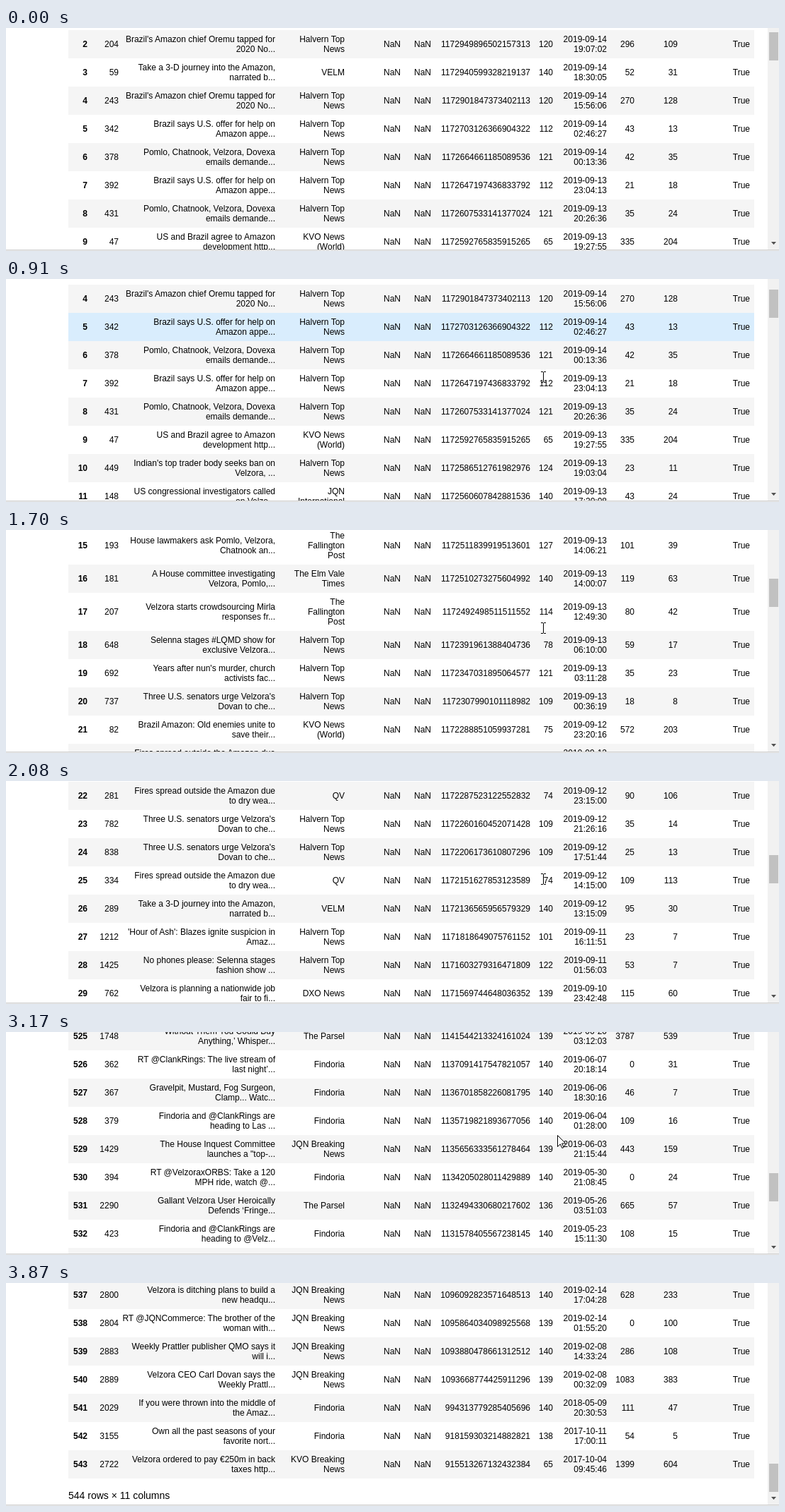
Recreate the animation shown at these times as an HTML page. Size 1091x316 px, loop 4270 ms.

```html
<!DOCTYPE html>
<html lang="en">
<head>
<meta charset="utf-8">
<title>Scrolling table</title>
<style>
html, body { margin: 0; width: 100%; height: 100%; overflow: hidden; background: #fff; }
body { position: relative; font: 12px/14px "Liberation Sans", Arial, sans-serif; color: #000; }
#view { position: absolute; left: 0; top: 0; width: 1091px; height: 314px; overflow: hidden; }
#doc { position: absolute; left: 88px; top: 3px; width: 968px; }
.row {
  display: grid; align-items: center; padding: 6px 0;
  grid-template-columns: 27px 44px 221px 98px 79px 43px 140px 32px 76px 39px 61px 102px;
  text-align: right; white-space: pre;
}
.row:nth-child(odd) { background: #f5f5f5; }
.row.hover { background: #d9edfd; }
.row > :first-child { font-weight: bold; }
#total { margin-top: 14px; font-size: 14px; line-height: 20px; }
#bar { position: absolute; left: 1075px; top: 0; width: 16px; height: 314px; background: #f1f1f1; }
#thumb { position: absolute; left: 2px; top: 6px; width: 13px; height: 40px; background: #c1c1c1; }
#down { position: absolute; left: 5px; top: 303px; width: 7px; height: 4px; background: #505050; clip-path: polygon(0 0, 100% 0, 50% 100%); }
#edge { position: absolute; left: 0; top: 314px; width: 100%; height: 1px; background: #ccc; border-bottom: 1px solid #ededed; }
svg { position: absolute; left: 0; top: 0; width: 14px; height: 21px; }
</style>
</head>
<body>
<div id="view">
  <div id="doc"></div>
  <div id="bar"><div id="thumb"></div><div id="down"></div></div>
</div>
<div id="edge"></div>
<svg id="arrow"><path d="M.5 .5V16.5L4.3 12.9L6.9 18.5L9.1 17.5L6.6 12H11.9Z" fill="#fff" stroke="#000"/></svg>
<svg id="beam"><path d="M0 .5H3M4 .5H7M3.5 1V15M0 15.5H3M4 15.5H7" fill="none" stroke="#000"/></svg>
<script>
// index | number | text | sender | id | length | date | likes | shares; "/" breaks a line
const data = `
2|204|Brazil's Amazon chief Oremu tapped for/2020 No...|Halvern Top/News|1172949896502157313|120|2019-09-14/19:07:02|296|109
3|59|Take a 3-D journey into the Amazon,/narrated b...|VELM|1172940599328219137|140|2019-09-14/18:30:05|52|31
4|243|Brazil's Amazon chief Oremu tapped for/2020 No...|Halvern Top/News|1172901847373402113|120|2019-09-14/15:56:06|270|128
5|342|Brazil says U.S. offer for help on/Amazon appe...|Halvern Top/News|1172703126366904322|112|2019-09-14/02:46:27|43|13
6|378|Pomlo, Chatnook, Velzora, Dovexa/emails demande...|Halvern Top/News|1172664661185089536|121|2019-09-14/00:13:36|42|35
7|392|Brazil says U.S. offer for help on/Amazon appe...|Halvern Top/News|1172647197436833792|112|2019-09-13/23:04:13|21|18
8|431|Pomlo, Chatnook, Velzora, Dovexa/emails demande...|Halvern Top/News|1172607533141377024|121|2019-09-13/20:26:36|35|24
9|47|US and Brazil agree to Amazon/development http...|KVO News/(World)|1172592765835915265|65|2019-09-13/19:27:55|335|204
10|449|Indian's top trader body seeks ban on/Velzora, ...|Halvern Top/News|1172586512761982976|124|2019-09-13/19:03:04|23|11
11|148|US congressional investigators called/on Velzo...|JQN/International|1172560607842881536|140|2019-09-13/17:20:08|43|24
12|481|Indian's top trader body seeks ban on/Velzora, ...|Halvern Top/News|1172551204817264640|124|2019-09-13/16:42:47|31|15
13|502|Pomlo, Chatnook, Velzora, Dovexa/emails demande...|Halvern Top/News|1172538417203462145|121|2019-09-13/15:51:58|28|19
14|164|US congressional investigators called/on Velzo...|JQN/International|1172524862140375041|140|2019-09-13/14:58:07|64|27
15|193|House lawmakers ask Pomlo, Velzora,/Chatnook an...|The/Fallington/Post|1172511839919513601|127|2019-09-13/14:06:21|101|39
16|181|A House committee investigating/Velzora, Pomlo,...|The Elm Vale/Times|1172510273275604992|140|2019-09-13/14:00:07|119|63
17|207|Velzora starts crowdsourcing Mirla/responses fr...|The/Fallington/Post|1172492498511511552|114|2019-09-13/12:49:30|80|42
18|648|Selenna stages #LQMD show for/exclusive Velzora...|Halvern Top/News|1172391961388404736|78|2019-09-13/06:10:00|59|17
19|692|Years after nun's murder, church/activists fac...|Halvern Top/News|1172347031895064577|121|2019-09-13/03:11:28|35|23
20|737|Three U.S. senators urge Velzora's/Dovan to che...|Halvern Top/News|1172307990101118982|109|2019-09-13/00:36:19|18|8
21|82|Brazil Amazon: Old enemies unite to/save their...|KVO News/(World)|1172288851059937281|75|2019-09-12/23:20:16|572|203
22|281|Fires spread outside the Amazon due/to dry wea...|QV|1172287523122552832|74|2019-09-12/23:15:00|90|106
23|782|Three U.S. senators urge Velzora's/Dovan to che...|Halvern Top/News|1172260160452071428|109|2019-09-12/21:26:16|35|14
24|838|Three U.S. senators urge Velzora's/Dovan to che...|Halvern Top/News|1172206173610807296|109|2019-09-12/17:51:44|25|13
25|334|Fires spread outside the Amazon due/to dry wea...|QV|1172151627853123589|74|2019-09-12/14:15:00|109|113
26|289|Take a 3-D journey into the Amazon,/narrated b...|VELM|1172136565956579329|140|2019-09-12/13:15:09|95|30
27|1212|'Hour of Ash': Blazes ignite suspicion in/Amaz...|Halvern Top/News|1171818649075761152|101|2019-09-11/16:11:51|23|7
28|1425|No phones please: Selenna stages/fashion show ...|Halvern Top/News|1171603279316471809|122|2019-09-11/01:56:03|53|7
29|762|Velzora is planning a nationwide job/fair to fi...|DXO News|1171569744648036352|139|2019-09-10/23:42:48|115|60
...|...|...|...|...|...|...|...|...
514|1030|Brazil’s Deforestation Of Amazon/Increased By ...|The Parsel|1155965003498844160|127|2019-07-29/22:15:08|455|61
515|2817|RT @CPLimelightHub: Elin/Marchbury says playin...|The Collated/Press|1155314949515878401|140|2019-07-28/03:12:03|0|21
516|2280|Amazon deforestation: Brazil's/Tavarenzo dismi...|KVO News/(World)|1152354566089904128|89|2019-07-19/23:08:32|216|145
517|1322|Velzora Workers Attempting Walkout/Enter 7th Ho...|The Parsel|1150870167733383174|125|2019-07-15/20:50:04|2204|413
518|1324|Exhausted Velzora Customer Forced/To Piss In Bo...|The Parsel|1150854623386845192|129|2019-07-15/19:48:18|2174|381
519|2625|Dovexa, Velzora, Vidlora: What is/France's tech...|KVO News/(World)|1149278189618946049|77|2019-07-11/11:24:07|169|64
520|2641|Velzora workers plan a summer/strike over pa...|KVO News/(World)|1148630217459036160|82|2019-07-09/16:29:18|142|58
521|1496|Velzora to retrain a third of its/workers by ...|JQN Breaking/News|1147302846175920128|136|2019-07-06/00:34:51|391|124
522|338|Deep in the Amazon, a new species/is found ...|Findoria|1145816320741552129|140|2019-07-01/22:07:56|96|22
523|1617|Velzora Warehouse Adds Third/Chair To Brea...|The Parsel|1144093718260490241|128|2019-06-27/04:02:54|1208|176
524|351|RT @ClankRings: Tonight the final/eight rob...|Findoria|1142810537904128000|140|2019-06-23/15:04:02|0|18
525|1748|‘Without Them You Could Buy/Anything,’ Whisper...|The Parsel|1141544213324161024|139|2019-06-20/03:12:03|3787|539
526|362|RT @ClankRings: The live stream of/last night’...|Findoria|1137091417547821057|140|2019-06-07/20:18:14|0|31
527|367|Gravelpit, Mustard, Fog Surgeon,/Clamp... Watc...|Findoria|1136701858226081795|140|2019-06-06/18:30:16|46|7
528|379|Findoria and @ClankRings are/heading to Las ...|Findoria|1135719821893677056|140|2019-06-04/01:28:00|109|16
529|1429|The House Inquest Committee/launches a "top-...|JQN Breaking/News|1135656333561278464|139|2019-06-03/21:15:44|443|159
530|394|RT @VelzoraxORBS: Take a 120/MPH ride, watch @...|Findoria|1134205028011429889|140|2019-05-30/21:08:45|0|24
531|2290|Gallant Velzora User Heroically/Defends ‘Fringe...|The Parsel|1132494330680217602|136|2019-05-26/03:51:03|665|57
532|423|Findoria and @ClankRings are/heading to @Velz...|Findoria|1131578405567238145|140|2019-05-23/15:11:30|108|15
533|2391|Velzora shareholders reject limits/on face sc...|KVO News/(World)|1131284610935820288|84|2019-05-22/19:44:04|131|72
534|2467|Velzora Customer Reads Entire/Review Of Gar...|The Parsel|1124760381947105280|121|2019-05-04/19:39:10|918|102
535|2533|Velzora will speed up its free/deliveries to ...|JQN Breaking/News|1121517042869374976|138|2019-04-25/20:51:18|402|131
536|2790|Velzora drops a plan to build a/second office ...|JQN Breaking/News|1101284350716928000|139|2019-03-01/00:54:12|517|148
537|2800|Velzora is ditching plans to build a/new headqu...|JQN Breaking/News|1096092823571648513|140|2019-02-14/17:04:28|628|233
538|2804|RT @JQNCommerce: The brother of the/woman with...|JQN Breaking/News|1095864034098925568|139|2019-02-14/01:55:20|0|100
539|2883|Weekly Prattler publisher QMO says it/will i...|JQN Breaking/News|1093880478661312512|140|2019-02-08/14:33:24|286|108
540|2889|Velzora CEO Carl Dovan says the/Weekly Prattl...|JQN Breaking/News|1093668774425911296|139|2019-02-08/00:32:09|1083|383
541|2029|If you were thrown into the middle of/the Amaz...|Findoria|994313779285405696|140|2018-05-09/20:30:53|111|47
542|3155|Own all the past seasons of your/favorite nort...|Findoria|918159303214882821|138|2017-10-11/17:00:11|54|5
543|2722|Velzora ordered to pay €250m in back/taxes http...|KVO Breaking/News|915513267132432384|65|2017-10-04/09:45:46|1399|604`;

const LOOP = 4270, END = 2100;
const $ = id => document.getElementById(id);
const doc = $('doc'), thumb = $('thumb'), arrow = $('arrow'), beam = $('beam');
const rows = {};

function add(parent, text, cls) {
  const el = document.createElement('div');
  el.textContent = text;
  if (cls) el.className = cls;
  return parent.appendChild(el);
}

for (const line of data.trim().split('\n')) {
  const cells = line.split('|');
  const gap = cells[0] === '...';
  cells.splice(4, 0, ...(gap ? ['...', '...'] : ['NaN', 'NaN']));
  cells.push(gap ? '...' : 'True');
  const row = rows[cells[0]] = add(doc, '', 'row');
  for (const cell of cells) add(row, cell.replace(/\//g, '\n'));
}
add(doc, '544 rows × 11 columns').id = 'total';

// [time, scroll offset]
const scrolls = [
  [0, 0],
  [760, 2], [840, 30], [910, 75], [990, 200],
  [1230, 205], [1310, 260], [1390, 400], [1460, 500],
  [1630, 502], [1700, 528], [1780, 670], [1860, 800],
  [2010, 802], [2080, 830], [2160, 885], [2240, 960], [2320, 1030], [2390, 1080], [2470, 1100],
  [2620, 1102], [2700, 1170], [2780, 1330], [2850, 1510], [2930, 1600],
  [3100, 1602], [3170, 1631], [3250, 1720], [3320, 1840], [3400, 1970], [3480, 2070], [3550, END]
];

// [time, shape, x, y, hovered row]
const moves = [
  [0],
  [70, arrow, 790, 198, 6], [150, arrow, 768, 152, 5], [220, arrow, 758, 134, 5],
  [450, beam, 756, 130, 5], [530, beam, 755, 131, 5],
  [3100, arrow, 778, 146], [3550, arrow, 778, 153],
  [3640, arrow, 778, 172, 541], [3710, arrow, 778, 245, 543], [3790, arrow, 778, 297],
  [3870]
];

const at = (keys, t) => keys.findLast(k => k[0] <= t);
let hovered;

function draw(now) {
  const t = now % LOOP;
  const s = at(scrolls, t)[1];
  doc.style.top = 3 - s + 'px';
  thumb.style.top = Math.round(6 + s / END * 250) + 'px';

  const [, shape, x, y, index] = at(moves, t);
  for (const c of [arrow, beam]) c.style.display = c === shape ? 'block' : 'none';
  if (shape) {
    shape.style.left = x + 'px';
    shape.style.top = y + 'px';
  }
  if (hovered !== rows[index]) {
    hovered?.classList.remove('hover');
    hovered = rows[index];
    hovered?.classList.add('hover');
  }
}

let start;
function tick(now) {
  start ??= now;
  draw(now - start);
  requestAnimationFrame(tick);
}
draw(0);
requestAnimationFrame(tick);
</script>
</body>
</html>
```
